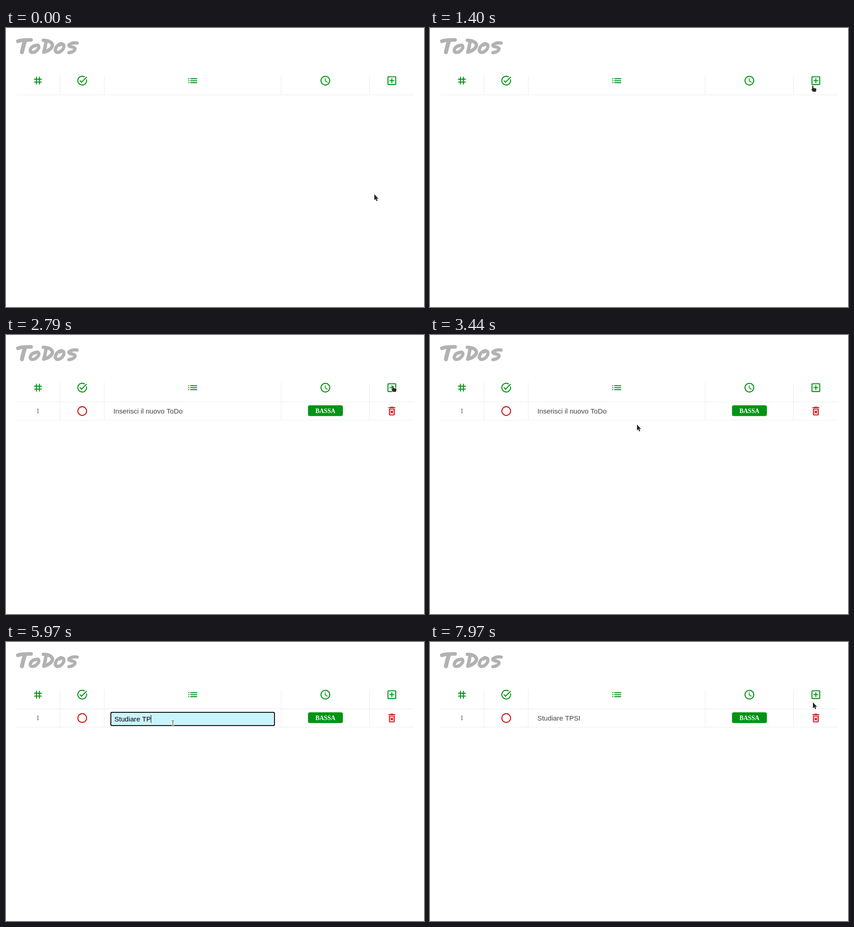
Recreate the animation shown at these times as an HTML page with a canvas. Size 917x611 px, loop 8 s.

```html
<!DOCTYPE html>
<html lang="it">
<head>
<meta charset="utf-8">
<title>ToDos</title>
<style>
  html, body { margin: 0; width: 100%; height: 100%; overflow: hidden; background: #fff; }
  canvas { display: block; }
</style>
</head>
<body>
<canvas id="stage" width="917" height="611"></canvas>
<script>
const ctx = document.getElementById('stage').getContext('2d');
const LOOP = 8000;
const GREEN = '#009414', RED = '#cd1719', LINE = '#e8eeee';
const SANS = '15.2px "Liberation Sans", Arial, sans-serif';
const SERIF = '13.6px "Liberation Serif", "Times New Roman", serif';
const PROMPT = 'Inserisci il nuovo ToDo';
const ENTRY = 'Studiare TPSI';

const ROW_IN = 2130, FADE = 600, EDIT = 3590, ENTER = 7040;
const KEY_TIMES = [4360, 4620, 4740, 5080, 5220, 5330, 5440, 5550, 5650, 5840, 5970, 6130, 6260];
const CARET_OFF = [[4090, 4360], [6860, ENTER]];

// Pointer path: time, x, y
const PATH = [
  [100, 808, 364], [240, 551, 396], [480, 551, 396], [720, 440, 380], [1000, 640, 240],
  [1200, 864, 118], [1310, 852, 124], [1390, 840, 126], [1500, 840, 126], [1660, 846, 118],
  [2650, 846, 118], [2790, 849, 111], [2920, 849, 111], [3150, 770, 178], [3350, 560, 208],
  [3560, 366, 178], [7500, 366, 178], [7680, 600, 122], [7820, 770, 106], [7960, 840, 132]
];

// Icons on a 24-unit grid, drawn as strokes
const ICONS = {
  hash: 'M9 4v16M15 4v16M4 9h16M4 15h16',
  done: 'M17 4.5A9 9 0 1 0 20.6 9.4M7.05 11.65L10.6 15.2L21.3 4.5',
  list: 'M3 8h2M3 12h2M3 16h2M7 8h14M7 12h14M7 16h14',
  ring: 'M21 12a9 9 0 1 1-18 0a9 9 0 1 1 18 0',
  hands: 'M11.75 7v5.6l4.9 2.9',
  add: 'M5 4h14a1 1 0 0 1 1 1v14a1 1 0 0 1-1 1h-14a1 1 0 0 1-1-1v-14a1 1 0 0 1 1-1zM12 7v10M7 12h10',
  trash: 'M9 4h6M5 5h14M7 8v11a1 1 0 0 0 1 1h8a1 1 0 0 0 1-1v-11zM9.2 11.2l5.6 5.6M14.8 11.2l-5.6 5.6'
};

const TITLE = [
  [8, 'M26 29Q34 26 55 26'],
  [9, 'M41 30Q37 42 35 53'],
  [7, 'M66 38Q54 40 53 50Q55 56 64 52Q73 46 72 40Q70 36 64 39'],
  [7.5, 'M88 30Q86 42 83 53M82 27Q101 28 102 38Q100 48 83 53'],
  [7, 'M121 34Q109 38 108 49Q110 56 119 52Q128 46 127 38Q125 33 118 37'],
  [7, 'M156 33Q146 31 138 37Q137 41 147 42Q154 44 150 49Q146 53 138 54']
];

const ARROW = new Path2D('M0 0V13L3 10.4L5 15.2L7.2 14.2L5.2 9.8H9Z');
const HAND = new Path2D('M-1.5 1Q0 -.7 1 1V5L6.5 6.5Q8 7 7.5 9L6.5 13.5H0L-3.5 8.5Q-3.5 7 -1.5 8Z');
const BEAM = new Path2D('M-2.5 -5.5H-.8L0 -4.8L.8 -5.5H2.5M0 -4.8V4.8M-2.5 5.5H-.8L0 4.8L.8 5.5H2.5');

function icon(name, x, y, color, width = 2) {
  ctx.save();
  ctx.translate(x, y);
  ctx.scale(16 / 15, 16 / 15);
  ctx.translate(-12, -12);
  ctx.strokeStyle = color;
  ctx.lineWidth = width;
  ctx.stroke(new Path2D(ICONS[name]));
  ctx.restore();
}

function text(str, x, y, color, font, align = 'left') {
  ctx.font = font;
  ctx.fillStyle = color;
  ctx.textAlign = align;
  ctx.fillText(str, x, y);
}

function box(x, y, w, h, r, color) {
  ctx.fillStyle = color;
  ctx.beginPath();
  ctx.roundRect(x, y, w, h, r);
  ctx.fill();
}

function grid(top, bottom) {
  ctx.fillStyle = LINE;
  ctx.fillRect(22, bottom, 873, 1);
  for (const x of [118, 215, 603, 797]) ctx.fillRect(x, top, 1, bottom - top);
}

function drawTitle() {
  ctx.save();
  ctx.strokeStyle = '#b2b2b2';
  ctx.lineCap = ctx.lineJoin = 'round';
  for (const [width, d] of TITLE) {
    ctx.lineWidth = width;
    ctx.stroke(new Path2D(d));
  }
  ctx.restore();
}

function drawHeader() {
  grid(104, 146);
  icon('hash', 70, 115.3, GREEN);
  icon('done', 167.2, 115.3, GREEN);
  icon('list', 409.6, 115.3, GREEN);
  icon('ring', 700.6, 115.3, GREEN);
  icon('hands', 700.6, 115.3, GREEN, 1.5);
  icon('add', 846.5, 115.3, GREEN);
}

function drawEditor(t) {
  box(229, 153, 361, 31, 3.5, '#101010');
  box(231, 155, 357, 27, 2, '#caf4fb');
  const typed = ENTRY.slice(0, KEY_TIMES.filter(k => k <= t).length);
  text(typed || PROMPT, 237.8, 174, typed ? '#000' : '#757575', SANS);
  if (CARET_OFF.some(([from, to]) => t >= from && t < to)) return;
  const caretX = Math.floor(238 + ctx.measureText(typed).width);
  ctx.fillStyle = '#000';
  ctx.fillRect(typed ? caretX - 0.3 : 238, 160, 1, 17);
}

function drawRow(t) {
  if (t < ROW_IN) return;
  ctx.globalAlpha = Math.min(1, (t - ROW_IN) / FADE);
  grid(147, 186);
  text('1', 70, 171, '#454560', SERIF, 'center');
  icon('ring', 167.2, 166.5, RED);
  box(662.5, 154, 76.5, 23.5, 4, GREEN);
  text('BASSA', 700.6, 171, '#fff', 'bold ' + SERIF, 'center');
  icon('trash', 846.5, 166.5, RED);
  if (t >= EDIT && t < ENTER) drawEditor(t);
  else text(t < EDIT ? PROMPT : ENTRY, 235.5, 172, '#444', SANS);
  ctx.globalAlpha = 1;
}

// Monotone cubic: smooth through the points, at rest where the pointer stops
function pathAt(t, axis) {
  const last = PATH.length - 1;
  if (t <= PATH[0][0]) return PATH[0][axis];
  if (t >= PATH[last][0]) return PATH[last][axis];
  const slope = i => i < 0 || i >= last ? 0 :
    (PATH[i + 1][axis] - PATH[i][axis]) / (PATH[i + 1][0] - PATH[i][0]);
  const tangent = i => {
    const a = slope(i - 1), b = slope(i);
    return a * b <= 0 ? 0 : 2 * a * b / (a + b);
  };
  const i = PATH.findIndex(p => p[0] > t) - 1;
  const span = PATH[i + 1][0] - PATH[i][0];
  const u = (t - PATH[i][0]) / span, v = 1 - u;
  return PATH[i][axis] * (1 + 2 * u) * v * v + PATH[i + 1][axis] * u * u * (3 - 2 * u)
    + span * u * v * (tangent(i) * v - tangent(i + 1) * u);
}

function drawPointer(t) {
  const x = pathAt(t, 1), y = pathAt(t, 2);
  const overAdd = Math.abs(x - 846.5) < 13 && Math.abs(y - 115.3) < 13;
  const overText = t >= ROW_IN && x > 216 && x < 603 && y > 147 && y < 186;
  ctx.save();
  ctx.translate(Math.round(x), Math.round(y));
  ctx.lineJoin = 'round';
  ctx.strokeStyle = '#fff';
  if (overText) {
    ctx.lineWidth = 2.4;
    ctx.stroke(BEAM);
    ctx.strokeStyle = '#222';
    ctx.lineWidth = 1;
    ctx.stroke(BEAM);
  } else {
    const shape = overAdd ? HAND : ARROW;
    ctx.lineWidth = 1.6;
    ctx.stroke(shape);
    ctx.fillStyle = '#262626';
    ctx.fill(shape);
  }
  ctx.restore();
}

function draw() {
  const t = performance.now() % LOOP;
  ctx.fillStyle = '#fff';
  ctx.fillRect(0, 0, 917, 611);
  drawTitle();
  drawHeader();
  drawRow(t);
  drawPointer(t);
  requestAnimationFrame(draw);
}
draw();
</script>
</body>
</html>
```
